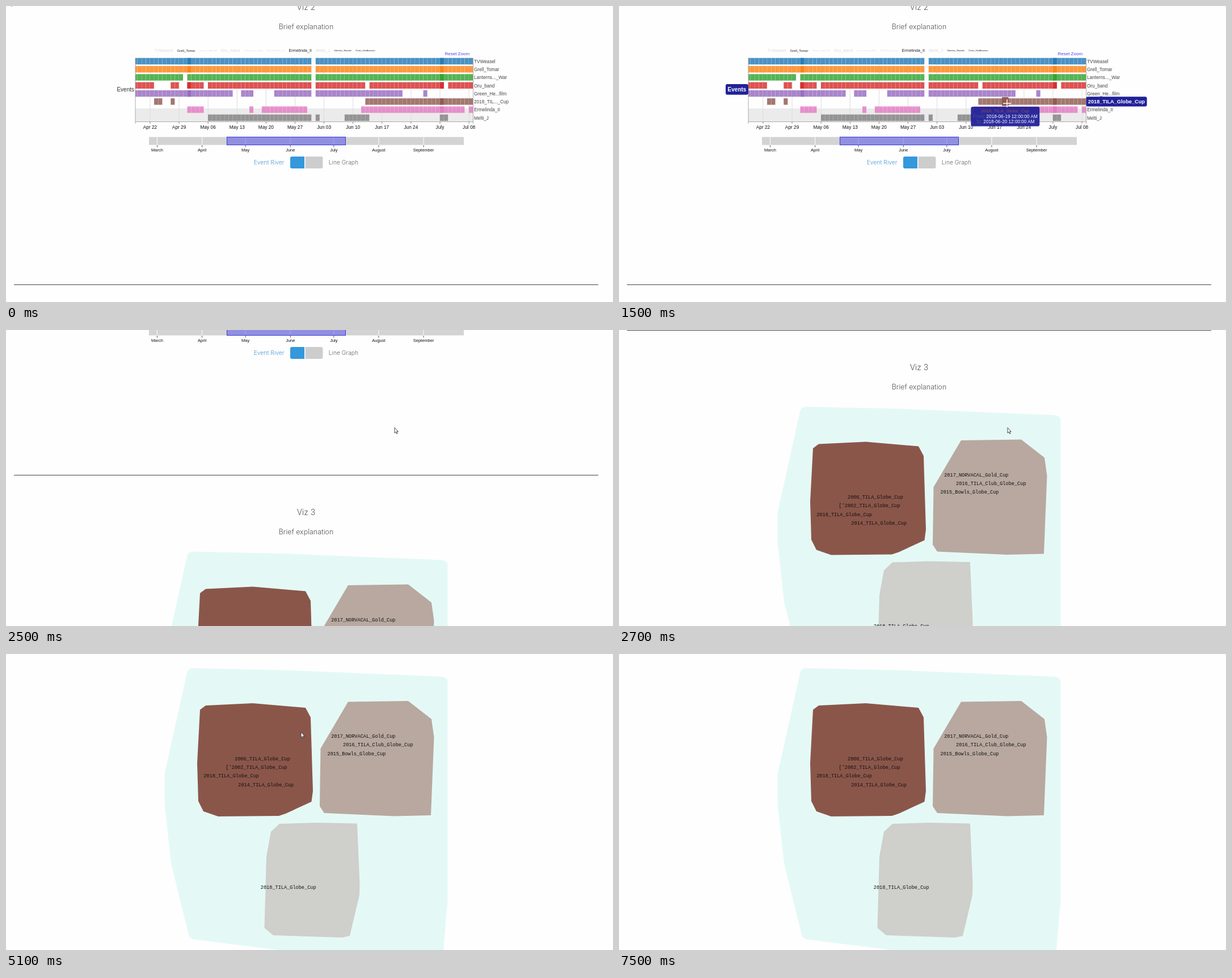
An HTML page that plays this animation: 1070 px wide and 523 px high, repeating every 7700 ms.

```html
<!DOCTYPE html>
<html lang="en">
<head>
<meta charset="utf-8">
<title>Event timeline</title>
<style>
  html, body { margin: 0; width: 100%; height: 100%; overflow: hidden; background: #fefefe; }
  svg { display: block; width: 1070px; height: 523px; }
  text { font-family: "Liberation Sans", Arial, sans-serif; white-space: pre; }
  .head { font-family: Inter, sans-serif; font-weight: 300; }
  .mono { font-family: "Liberation Mono", monospace; }
  .bold { font-weight: bold; }
</style>
</head>
<body>
<svg viewBox="0 0 1070 523">
  <g id="page"><g id="content"></g><g id="hover"></g></g>
  <g id="cursor"></g>
</svg>
<script>
const LOOP = 7700, NAVY = '#212199', MID = 'text-anchor="middle"';
const LEFT = 228, RIGHT = 823.5, FIRST_ROW = 97.5, ROW = 14.27, DAY_ZERO = 253.8, DAY = 7.3;
const dayX = d => DAY_ZERO + DAY * d;           // d counts days from April 22
const rowY = r => FIRST_ROW + ROW * r;
const date = d => new Date(Date.UTC(2018, 3, 22 + d));
const $ = id => document.getElementById(id);

const rect = (x, y, w, h, fill, extra = '') =>
  `<rect x="${x}" y="${y}" width="${w}" height="${h}" fill="${fill}" ${extra}/>`;
const line = (x1, y1, x2, y2, color) => `<path d="M${x1} ${y1}L${x2} ${y2}" stroke="${color}"/>`;
const polygon = (points, fill) => `<polygon points="${points}" fill="${fill}"/>`;
const label = (x, middle, str, size, fill, extra = '') =>
  `<text x="${x}" y="${middle + size * .36}" font-size="${size}" fill="${fill}" ${extra}>${str}</text>`;
const heading = (x, y, str, size, fill = '#555', extra = MID) =>
  label(x, y, str, size, fill, `class="head" ${extra}`);

const pen = document.createElement('canvas').getContext('2d');
function textWidth(str, size, weight = '') {
  pen.font = `${weight} ${size}px "Liberation Sans", Arial, sans-serif`;
  return pen.measureText(str).width;
}

// Spans are pairs of first day and end day; one day is missing in every row
const START = -3.53, END = 78, MISSING = 39, BUSY = [9, 70];
const rows = [
  ['TVWeasel', 'TVWeasel', '#1f77b4', [START, END]],
  ['Grell_Tomar', 'Grell_Tomar', '#ff7f0e', [START, END]],
  ['Lanterns..._War', 'Lanterns:_Twilight_War', '#2ca02c', [START, 8, 9, END]],
  ['Oru_band', 'Oru_band', '#d62728', [START, 1, 5, 7, 9, 10, 9, 13, 14, 52, 53, 71, 72, END]],
  ['Green_He...film', 'Green_Heronry_(film)', '#9467bd', [START, 20, 22, 25, 30, 61, 66, 67]],
  ['2018_TIL..._Cup', '2018_TILA_Globe_Cup', '#8c564b', [1, 3, 5, 6, 52, END]],
  ['Ermelinda_II', 'Ermelinda_II', '#e377c2', [9, 13, 24, 25, 27, 38, 51, 76, 77, END]],
  ['Melti_J', 'Melti_J', '#7f7f7f', [14, 41, 47, 53, 70, 72]]
].map(([short, name, color, spans]) => ({ short, name, color, spans }));

function eachDay({ spans }, visit) {
  for (let i = 0; i < spans.length; i += 2)
    for (let d = spans[i]; d < spans[i + 1]; d = Math.floor(d) + 1)
      if (d !== MISSING) visit(d, d > spans[i]);
}

function cells(row, r) {
  let out = '';
  eachDay(row, (d, continued) => {
    const width = dayX(Math.floor(d) + 1) - dayX(d) - .22;
    const cell = rect(dayX(d), rowY(r) - 5.7, width, 11.4, row.color, 'opacity=".8"');
    out += continued && BUSY.includes(d) ? cell + cell : cell;
  });
  return out;
}

function legend() {
  const sizes = [7.2, 5.9, 3, 7.5, 3.5, 3, 7.2, 8, 3.7, 4.4], dark = [1, 6, 8, 9];
  const names = [...rows.map(row => row.name), 'Valentino_Brasedo', 'Corin_Hadlowson'];
  let x = 261.5;
  return names.map((name, i) => {
    const word = label(x, 78.5, name, sizes[i], dark.includes(i) ? '#222' : '#dadada');
    x += textWidth(name, sizes[i]) + 7;
    return word;
  }).join('');
}

function chart() {
  let out = rect(LEFT, 181, RIGHT - LEFT, 23.5, '#ebebeb');
  for (let d = 0; d < END; d += 7) {
    const x = dayX(d) + .2, day = date(d);
    const name = day.getUTCDate() === 1 ? 'July'
      : day.toLocaleString('en-US', { month: 'short', day: '2-digit', timeZone: 'UTC' });
    out += line(x, 92, x, 204, '#ddd') + line(x, 204, x, 208, '#888')
      + label(x, 213.8, name, 8.3, '#111', MID);
  }
  out += rows.map(cells).join('')
    + '<path d="M228 208V92M228 204.5H823.5M823.5 92V208" stroke="#999" fill="none" stroke-width=".8"/>';
  rows.forEach((row, r) => out += label(825, rowY(r) + .3, row.short, 8.2, '#444'));
  return out + label(226, 147.5, 'Events', 10, '#333', 'text-anchor="end"')
    + label(773.5, 84, 'Reset Zoom', 8, '#4545ee');
}

function overview() {
  let marks = '', names = '';
  for (let month = 2; month < 9; month++) {
    const first = new Date(Date.UTC(2018, month, 1));
    const x = 266.5 + 2.552 * (first - Date.UTC(2018, 2, 1)) / 864e5;
    marks += line(x, 231.5, x, 245.5, '#fff');
    names += line(x, 246, x, 249.5, '#555')
      + label(x, 254, first.toLocaleString('en-US', { month: 'long', timeZone: 'UTC' }), 7.5, '#111', MID);
  }
  return rect(252, 231.5, 555, 14, '#d3d3d3') + marks
    + rect(389.5, 231.5, 209, 14, '#5a58ee', 'fill-opacity=".55" stroke="#3b3bd2"') + names;
}

function toggle() {
  return heading(490.5, 276, 'Event River', 10.3, '#4a97d2', 'text-anchor="end"')
    + '<path d="M526 266H504Q501 266 501 269V284Q501 287 504 287H526Z" fill="#3498db"/>'
    + '<path d="M527.5 266H555.5Q558.5 266 558.5 269V284Q558.5 287 555.5 287H527.5Z" fill="#cdcdcd"/>'
    + heading(568.7, 276, 'Line Graph', 10.3, '#666', '');
}

function clusters() {
  const list = (top, items) => items.map(([x, str], i) =>
    label(x, top + 15.3 * i, str, 8.58, '#111', 'class="mono"')).join('');
  return '<g transform="translate(0 602.5)">'
    + `<path fill="#e4f9f6" d="M319 34Q321 25 330 25L490 28.5L768 40Q778.5 41 778.5 50V435
        L769 548Q768 560 758 558L480 523L332 504.5Q324 503 322 496L291 370L279.5 265V212Z"/>`
    + polygon('342,98.5 352,91 435,87 528,95 537,112 541,242 538.5,261 493,282 481,286 374,287 348,278 339,260 337,193', '#8b564a')
    + polygon('603,84.5 709,83 750,115 754.5,147 749,285 684,286.5 561,281 553,269 554.5,167', '#b8a8a0')
    + polygon('482,300 546,298 619,299.5 623.5,405 623,426 606,498 593,501 471,497 455.5,484 459,358 467,314', '#cfcfcb')
    + list(184.6, [[403, '2006_TILA_Globe_Cup'], [387.5, "['2002_TILA_Globe_Cup"],
      [348.2, '2018_TILA_Globe_Cup'], [409.3, '2014_TILA_Globe_Cup']])
    + list(145, [[573.2, '2017_NORVACAL_Gold_Cup'], [594, '2016_TILA_Club_Globe_Cup'],
      [566.5, '2015_Bowls_Globe_Cup']])
    + list(412.3, [[448.8, '2018_TILA_Globe_Cup']]) + '</g>';
}

$('content').innerHTML = heading(529, 2, 'Viz 2', 14) + heading(529, 36.5, 'Brief explanation', 12.4)
  + legend() + chart() + overview() + toggle() + line(14, 492.5, 1044, 492.5, '#444')
  + heading(529, 557.5, 'Viz 3', 14) + heading(529, 593, 'Brief explanation', 12.4) + clusters();

function tooltip({ name, color }, r, d, opacity) {
  const x = dayX(d + .5), y = rowY(r) + 9.2;
  const moment = (key, day) =>
    `<tspan fill="#50508f">${key}:</tspan> ${date(day).toISOString().slice(0, 10)} 12:00:00 AM`;
  return `<g opacity="${opacity}">` + rect(x - 60.5, y, 121, 34.5, NAVY, 'rx="3" opacity=".95"')
    + label(x, y + 7.4, name, 8.1, color, MID)
    + label(x, y + 16.8, moment('From', d), 8.2, '#fff', MID)
    + label(x, y + 26, moment('To', d + 1), 8.2, '#fff', MID) + '</g>';
}

function badges({ name }, r) {
  const y = rowY(r);
  return rect(188, 138, 40, 18.7, NAVY, 'rx="3"')
    + label(208, 147.5, 'Events', 10, '#fff', `class="bold" ${MID}`)
    + rect(823.5, y - 8.6, textWidth(name, 9.2, 'bold') + 7, 17.2, NAVY, 'rx="3"')
    + label(826.8, y + .2, name, 9.2, '#fff', 'class="bold"');
}

// The cell under a point, or nothing
function cellAt([x, y]) {
  const r = Math.round((y - FIRST_ROW) / ROW), d = Math.floor((x - DAY_ZERO) / DAY);
  let hit = null;
  if (rows[r]) eachDay(rows[r], day => { if (day === d) hit = { row: rows[r], r, d }; });
  return hit;
}

// Key points: time followed by the values, joined by straight lines
const pointerPath = [
  [0, 6, -10.5], [300, 331, 156], [500, 521, 128], [700, 630, 137], [900, 668, 153],
  [1100, 682, 143], [1300, 684, 169], [1500, 684, 172], [2300, 684, 172], [2400, 685, 172.5],
  [5000, 685, 172.5], [5100, 520, 138], [5200, 438, 153], [5400, 397, 230], [5600, 543, 350],
  [5800, 608, 330], [6100, 234.5, 11], [6300, 234.5, 11], [6400, 82, -50], [7000, 82, -50],
  [7100, 82, -2], [7400, 61, -4], [7500, 61, -50]
];
const scrollPath = [[0, 0], [2300, 0], [2400, 108], [2700, 492], [2800, 612], [3100, 635],
  [3400, 635], [3500, 644], [3600, 644], [3700, 563], [3800, 602.5]];

function follow(path, t) {
  const i = path.findLastIndex(point => point[0] <= t);
  const [t0, ...from] = path[i], [t1, ...to] = path[i + 1] || [t0 + 1, ...from];
  return from.map((value, k) => value + (to[k] - value) * (t - t0) / (t1 - t0));
}

const ARROW = '<path d="M0 0V9.6L2.2 7.5L3.7 10.9L5.1 10.3L3.7 7H6.3Z" fill="#fff" stroke="#222" stroke-width=".8"/>';
const CROSS = '<path d="M-7 0H7M0 -7V7" stroke="#fff" stroke-width="1.5"/>';
const LEAVE = 2300;                             // the last hovered cell stays enlarged after this

function draw(t) {
  const [x, y] = follow(pointerPath, t);
  const cell = cellAt(follow(pointerPath, Math.min(t, LEAVE)));
  const hovering = cell && t <= LEAVE;
  let hover = '';
  if (cell) {
    const { row, r, d } = cell;
    hover = rect(dayX(d) - 2.2, rowY(r) - 8, 11.6, 15.8, row.color, 'opacity=".9"');
    const fade = t < 1300 ? 1 : Math.min(1, .5 + (t - 1300) / 400);
    if (hovering) hover += badges(row, r) + tooltip(row, r, d, fade);
  }
  $('hover').innerHTML = hover;
  $('page').setAttribute('transform', `translate(0 ${-follow(scrollPath, t)[0]})`);
  $('cursor').setAttribute('transform', `translate(${x} ${y})`);
  $('cursor').innerHTML = hovering ? CROSS : ARROW;
}

// The picture moves in steps, slower while the pointer crosses the rows
function stepTime(t) {
  const beat = t > 500 && t < 1300 ? 200 : 100;
  return Math.floor((t - 100) / beat) * beat + 100;
}

const begin = performance.now();
let shown;
function frame() {
  const t = stepTime((performance.now() - begin) % LOOP);
  if (t !== shown) draw(shown = t);
  requestAnimationFrame(frame);
}
frame();
</script>
</body>
</html>
```
